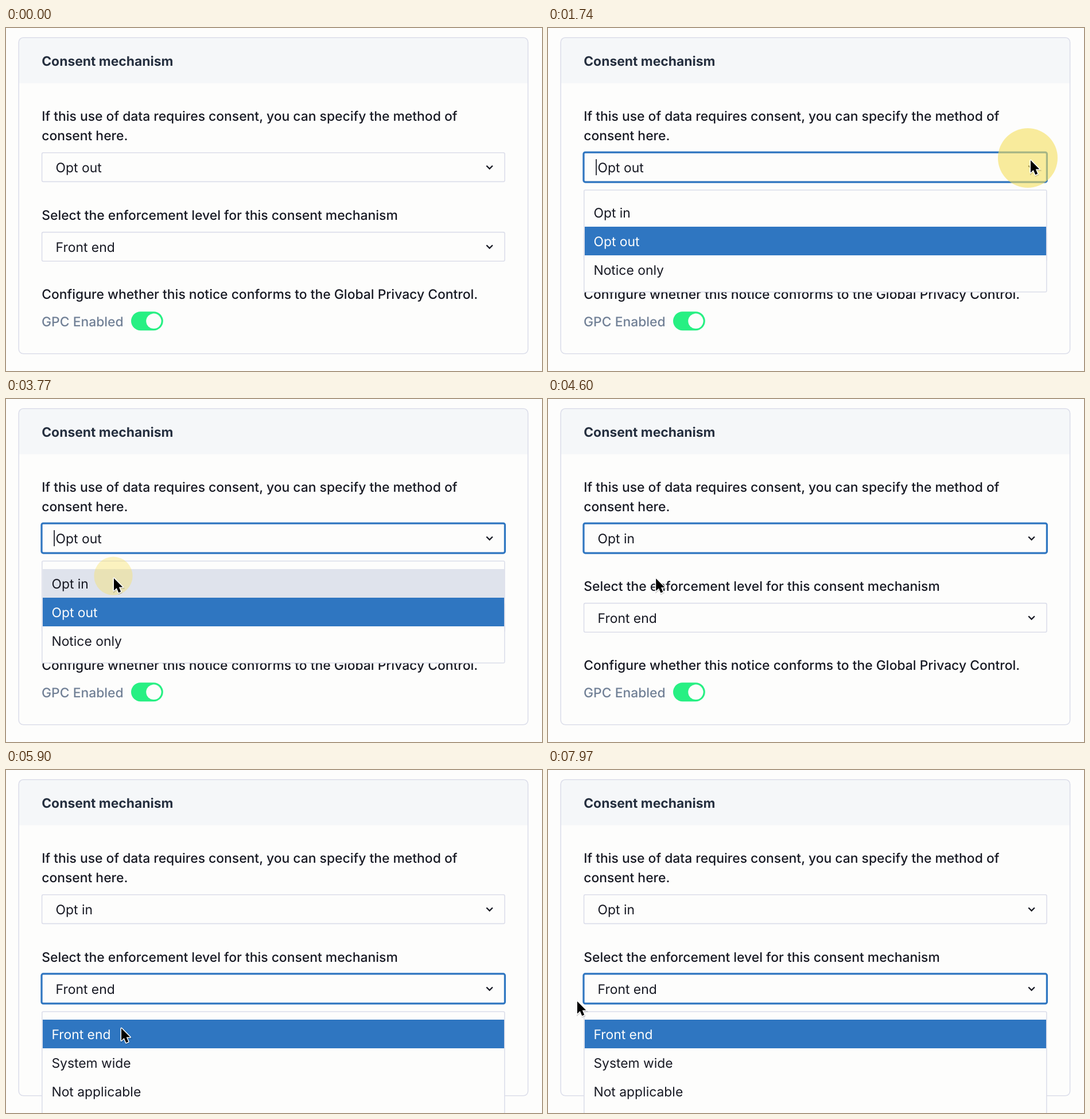
Write an HTML page that moves like this. It is 934 by 599 pixels and loops after 8000 ms.

```html
<!DOCTYPE html>
<html lang="en">
<head>
<meta charset="utf-8">
<title>Consent mechanism</title>
<style>
  html, body { margin: 0; width: 100%; height: 100%; overflow: hidden; background: #fdfdfc; }
  svg { display: block; width: 934px; height: 599px; }
  text {
    font: 400 22.88px Inter, "Liberation Sans", sans-serif;
    font-optical-sizing: none;
    text-rendering: geometricPrecision;
    fill: #171923;
  }
  .label { font-weight: 500; }
  .title { font-weight: 700; fill: #252f3f; }
  .muted { fill: #718096; }
  .line { fill: none; stroke: #dcdeea; stroke-width: 1.6; }
</style>
</head>
<body>
<svg id="stage" viewBox="0 0 934 599"></svg>
<script>
const LOOP = 8000;
const BLUE = '#2f76c1', PAPER = '#fdfdfc', INK = '#171923';
const ROW = 50;
const stage = document.getElementById('stage');

function add(tag, attrs, parent = stage) {
  const node = document.createElementNS('http://www.w3.org/2000/svg', tag);
  set(node, attrs);
  parent.appendChild(node);
  return node;
}
function set(node, attrs) {
  for (const key in attrs) node.setAttribute(key, attrs[key]);
}
function show(node, visible) {
  node.style.display = visible ? '' : 'none';
}
// Places text so that its capitals are centred on middle.
function write(content, x, middle, cls = '', parent = stage) {
  const node = add('text', { x, y: middle + 8.3, class: cls }, parent);
  node.textContent = content;
  return node;
}
const clamp = v => Math.max(0, Math.min(1, v));
const smooth = p => p * p * (3 - 2 * p);

// Card
add('path', { d: 'M22 96.5V25a8 8 0 0 1 8-8H902a8 8 0 0 1 8 8V96.5Z', fill: '#f5f7f9' });
add('rect', { x: 22.2, y: 16.8, width: 887.4, height: 552, rx: 8, class: 'line' });
write('Consent mechanism', 62.2, 57.2, 'title');
write('If this use of data requires consent, you can specify the method of', 62.2, 153.7, 'label');
write('consent here.', 62.2, 187.9, 'label');
write('Select the enforcement level for this consent mechanism', 62.2, 326.5, 'label');
write('Configure whether this notice conforms to the Global Privacy Control.', 62.2, 465.1, 'label');
write('GPC Enabled', 62, 512.3, 'label muted');
add('rect', { x: 218, y: 495.2, width: 55.8, height: 33, rx: 16.5, fill: '#27f083' });
add('circle', { cx: 257.4, cy: 511.8, r: 13.2, fill: PAPER });

function makeSelect(middle, value) {
  const box = add('rect', { x: 62.6, y: middle - 25.3, width: 806.4, height: 50.6, rx: 2.5, class: 'line' });
  const ring = add('rect', {
    x: 62, y: middle - 26, width: 807.4, height: 52, rx: 3,
    fill: 'none', stroke: BLUE, 'stroke-width': 3.2
  });
  const text = write(value, 86.6, middle + .6);
  const caret = add('rect', { x: 83.2, y: middle - 14, width: 1.7, height: 28, fill: INK });
  add('path', {
    d: `M837.3 ${middle - 2.6}l5.3 5.3 5.3-5.3`, fill: 'none', stroke: INK, 'stroke-width': 2.3
  });
  return { middle, box, ring, text, caret };
}

function makeMenu(top, labels, selected) {
  const group = add('g', {});
  add('rect', { x: 62.8, y: top, width: 806, height: 178, rx: 2, class: 'line', style: `fill:${PAPER}` }, group);
  const rows = labels.map((label, i) => {
    const y = top + 14 + i * ROW;
    const back = add('rect', { x: 64, y, width: 804, height: ROW, fill: 'none' }, group);
    const text = write(label, 79.4, y + 26, '', group);
    if (i === selected) {
      set(back, { fill: BLUE });
      text.style.fill = PAPER;
    }
    return { y, back };
  });
  return { group, rows, selected };
}

const method = makeSelect(243.1, 'Opt out');
const level = makeSelect(381.9, 'Front end');
const methodMenu = makeMenu(283, ['Opt in', 'Opt out', 'Notice only'], 1);
const levelMenu = makeMenu(422, ['Front end', 'System wide', 'Not applicable'], 0);

const halo = add('circle', { fill: '#f6e05e' });
const pointer = add('g', {});
const ARROW = 'M1 2V23.5L5.8 19 9.3 27.2 13.2 25.5 9.8 17.6H16.3Z';
add('path', { d: ARROW, transform: 'translate(.6 1.6)', fill: '#000', stroke: '#000', 'stroke-width': 3, opacity: .15 }, pointer);
add('path', { d: ARROW, fill: '#000', stroke: '#fff', 'stroke-width': 3, 'stroke-linejoin': 'round', 'paint-order': 'stroke' }, pointer);

// Pointer stops: time, x, y
const route = [
  [60, 950, 330], [850, 850, 240], [1450, 840, 229], [2350, 840, 229],
  [3500, 187, 311], [4580, 187, 311], [5080, 223, 385], [5420, 223, 385],
  [5900, 200, 449], [6270, 189, 556], [6440, 188, 572], [7310, 188, 572], [7960, 50, 402]
];
const clicks = [
  { down: 1520, up: 1800, x: 836, y: 227 },
  { down: 3690, up: 3890, x: 187, y: 309 },
  { down: 5120, up: 5300, x: 222, y: 385 }
];
const [openMethod, pickMethod, openLevel] = clicks;

function pointerAt(t) {
  const next = route.findIndex(stop => stop[0] > t);
  if (next === 0) return route[0].slice(1);
  if (next < 0) return route[route.length - 1].slice(1);
  const [t0, x0, y0] = route[next - 1], [t1, x1, y1] = route[next];
  const p = smooth((t - t0) / (t1 - t0));
  return [x0 + (x1 - x0) * p, y0 + (y1 - y0) * p];
}

function drawSelect(select, focus, caretOn, x, y) {
  const hovered = x > 62 && x < 870 && Math.abs(y - select.middle) < 26;
  select.box.style.stroke = hovered ? '#b9bec9' : '';
  set(select.ring, { opacity: focus });
  show(select.caret, caretOn);
}

function drawMenu(menu, open, pressed, x, y) {
  show(menu.group, open);
  menu.rows.forEach((row, i) => {
    if (i === menu.selected) return;
    const hovered = x > 63 && x < 869 && y >= row.y && y < row.y + ROW;
    set(row.back, { fill: !hovered ? 'none' : pressed ? '#dfe3ec' : '#e8edf2' });
  });
}

function drawHalo(t) {
  const click = clicks.find(c => t >= c.down && t < c.up + 200);
  show(halo, click);
  if (!click) return;
  const grow = 1 - (1 - clamp((t - click.down) / 200)) ** 2;
  const fade = 1 - clamp((t - click.up) / 200);
  set(halo, { cx: click.x, cy: click.y, r: 52 * grow, opacity: .6 * grow * fade });
}

function render(t) {
  const [x, y] = pointerAt(t);
  const blink = start => t >= start && (t - start) % 1000 < 500;
  const shift = clamp((t - openLevel.down - 90) / 180);
  const methodOpen = t >= openMethod.down && t < pickMethod.up;
  const pressed = t >= pickMethod.down && t < pickMethod.up;

  drawSelect(method, clamp((t - openMethod.down) / 200) * (1 - shift), methodOpen && blink(openMethod.down), x, y);
  drawSelect(level, shift, blink(openLevel.down), x, y);
  method.text.textContent = t < pickMethod.up ? 'Opt out' : 'Opt in';
  drawMenu(methodMenu, methodOpen, pressed, x, y);
  drawMenu(levelMenu, t >= openLevel.down, false, x, y);
  drawHalo(t);
  set(pointer, { transform: `translate(${x} ${y})` });
}

const start = performance.now();
function tick() {
  render((performance.now() - start) % LOOP);
  requestAnimationFrame(tick);
}
tick();
</script>
</body>
</html>
```
